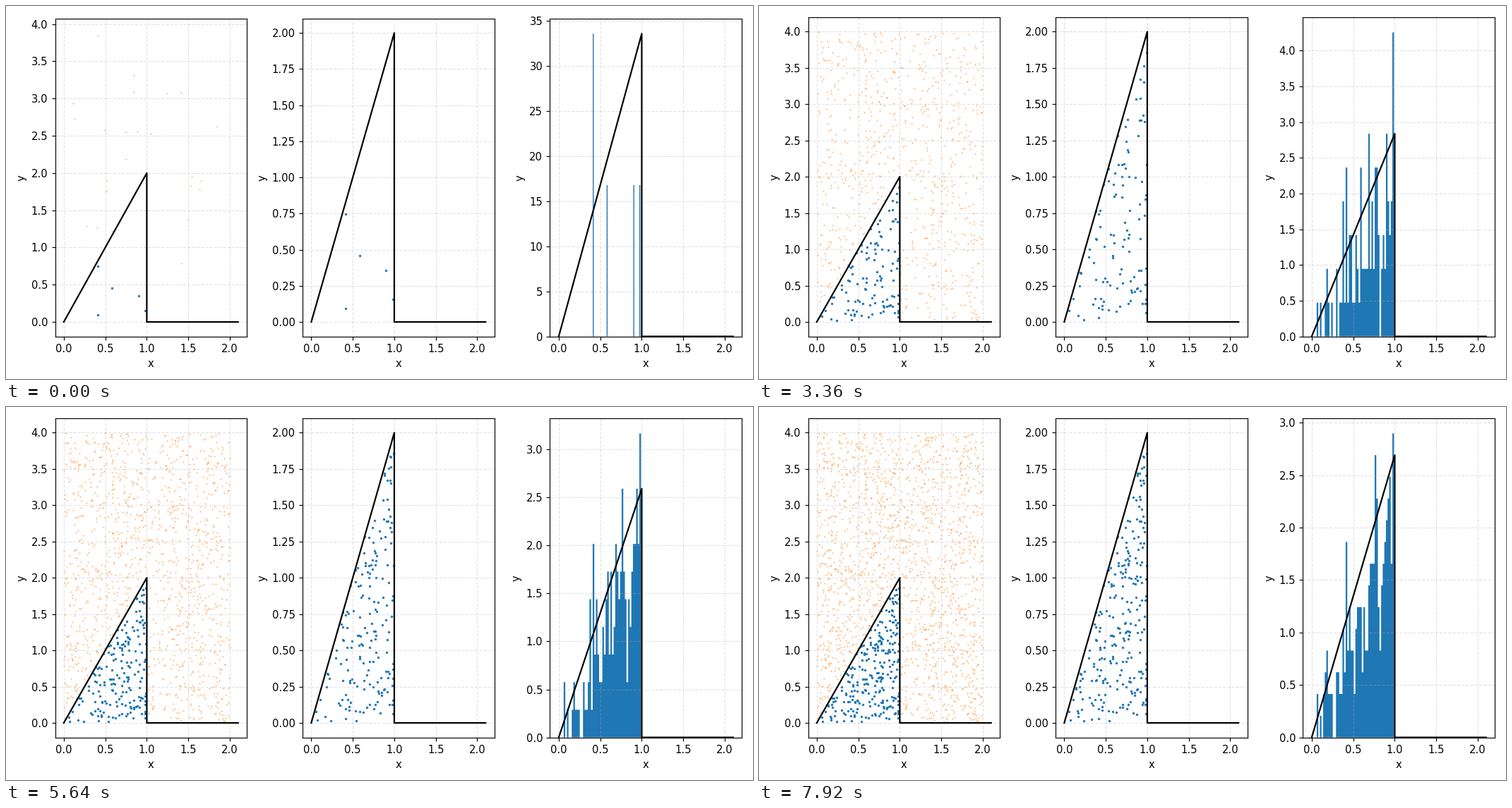
Recreate the animation shown at these times as a matplotlib script. Size 1058 by 529 pixels, loop 8 s.

```python
import matplotlib.pyplot as plt
import numpy as np
from matplotlib.animation import FuncAnimation

W, H, DPI = 1058, 529, 105.8
FRAME_MS, FRAMES, HOLD = 40, 200, 3   # a new batch of samples every 120 ms
STEPS = -(-FRAMES // HOLD)
BATCH, HIT_RATE = 30, 3.7             # samples and mean hits per batch
BINS, BULK = 48, 43                   # the curve is scaled to the first 90 % of bins
PAD_TOP, LABEL_RISE = 15.9, 5

START = np.array([(.41, .746), (.41, .095), (.58, .459), (.9, .355), (.982, .157)])

rng = np.random.default_rng(7)


def hit_count(step):
    return len(START) + round(HIT_RATE * step)


def miss_count(step):
    return BATCH * (step + 1) - hit_count(step)


def make_hits():
    """Uniform points under y = 2x, with a slowly thinning run at the right edge."""
    n = hit_count(STEPS - 1) - len(START)
    x = .975 * np.sqrt(rng.random(n))
    edge = (1.25 * np.arange(3, 15) ** 2).astype(int) - len(START)
    x[edge] = rng.uniform(.976, .994, len(edge))
    y = 2 * x * rng.random(n)
    return np.vstack([START, np.column_stack([x, y])])


def make_misses():
    p = rng.uniform((0, 0), (2, 4), (2 * BATCH * STEPS, 2))
    outside = (p[:, 0] > 1) | (p[:, 1] > 2 * p[:, 0])
    return p[outside]


HITS, MISSES = make_hits(), make_misses()

fig, axes = plt.subplots(1, 3, figsize=(10, 5), dpi=DPI)
fig.subplots_adjust(left=69.5 / W, right=1042.1 / W, bottom=60.4 / H,
                    top=1 - PAD_TOP / H, wspace=.2905)
left, mid, right = axes


def dots(ax, color, size, alpha=1):
    return ax.plot([], [], "o", color=color, ms=size, mew=0,
                   alpha=alpha, zorder=1)[0]


curves = []
for ax in axes:
    ax.set(xlabel="x", ylabel="y", xlim=(-.105, 2.205))
    ax.grid(linestyle="--", alpha=.35)
    curves.append(ax.plot([0, 1, 1, 2.1], [0, 2, 0, 0], "k")[0])
mid.set_ylim(-.1, 2.1)

miss_dots = dots(left, "tab:orange", 1.5, .5)
hit_dots = [dots(ax, "tab:blue", 2.3) for ax in (left, mid)]
bars = right.stairs(np.zeros(BINS), np.linspace(0, 1, BINS + 1),
                    fill=True, color="tab:blue", snap=False)


def fit_top():
    """Lower the axes a little when the top tick label sticks out."""
    top = right.get_ylim()[1]
    tick = max(t for t in right.get_yticks() if t <= top)
    gap = (top - tick) / top * right.bbox.height
    over = max(0, LABEL_RISE - gap)
    fig.subplots_adjust(top=1 - (PAD_TOP + over) / H)


def update(i):
    step = i // HOLD
    hits = HITS[:hit_count(step)]
    misses = MISSES[:miss_count(step)]

    miss_dots.set_data(*misses.T)
    for d in hit_dots:
        d.set_data(*hits.T)
    high = 4 - .12 / (step + 1)       # highest sample so far nears 4
    left.set_ylim(-.05 * high, 1.05 * high)

    density, edges = np.histogram(hits[:, 0], BINS, density=True)
    bars.set_data(density, edges)
    curves[2].set_ydata([0, density[:BULK].max(), 0, 0])
    right.set_ylim(0, 1.05 * density.max())
    fit_top()
    return [miss_dots, *hit_dots, bars, curves[2]]


anim = FuncAnimation(fig, update, frames=FRAMES, interval=FRAME_MS,
                     repeat=True, repeat_delay=0)
plt.show()
```
